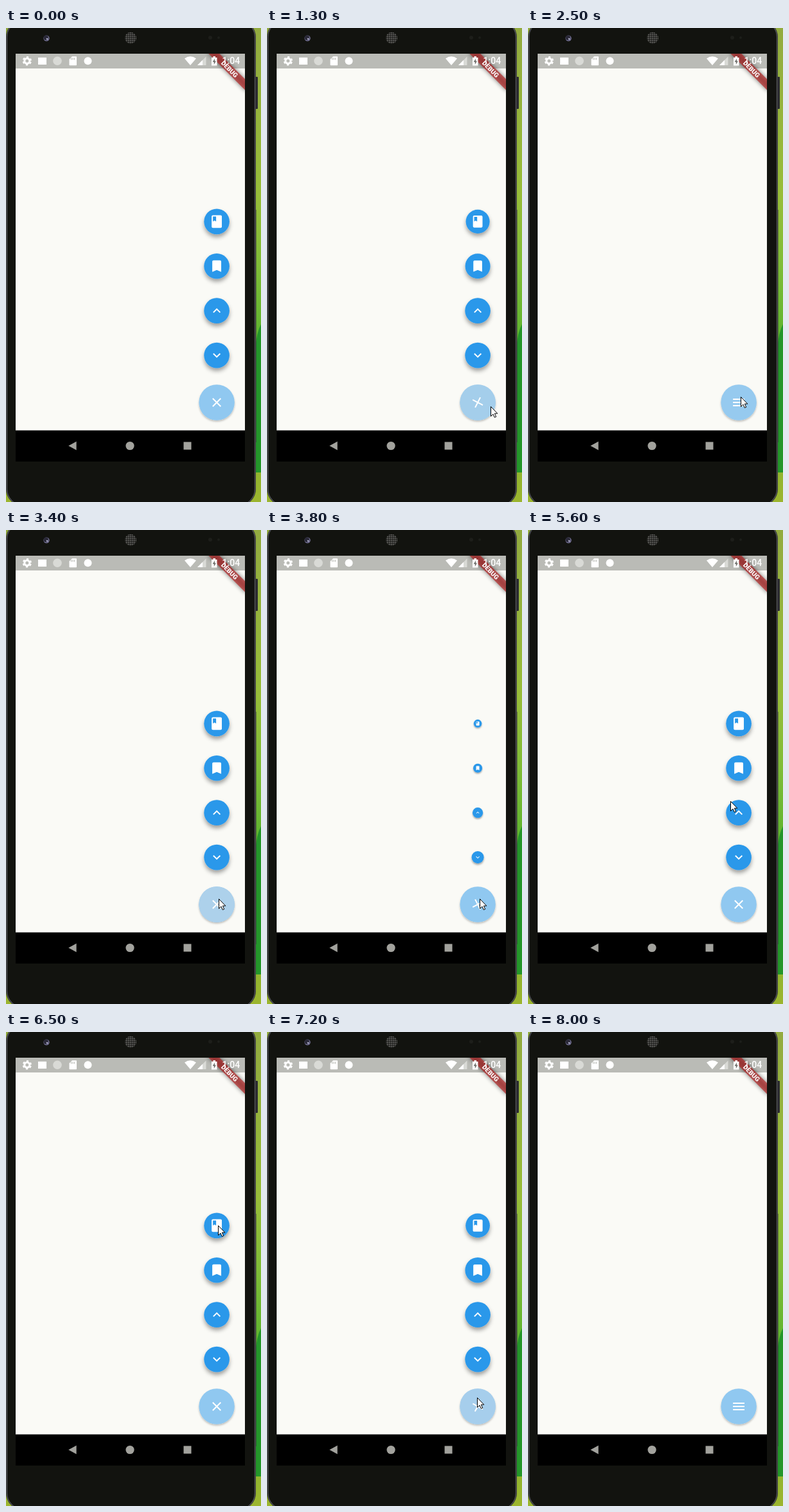
Write an HTML page that moves like this. It is 397x738 px and loops after 8100 ms.

```html
<!DOCTYPE html>
<html lang="en">
<head>
<meta charset="utf-8">
<title>Speed dial</title>
<style>
  html, body { margin: 0; width: 100%; height: 100%; overflow: hidden; }
  svg { display: block; }
  text { font-family: Roboto, sans-serif; fill: #fff; }
</style>
</head>
<body>
<svg width="397" height="738" viewBox="0 0 397 738">
  <defs>
    <linearGradient id="wall" x2="0" y2="1">
      <stop offset="0" stop-color="#93ab40"/>
      <stop offset=".35" stop-color="#98bd3a"/>
      <stop offset=".5" stop-color="#80bd38"/>
      <stop offset=".64" stop-color="#62b530"/>
      <stop offset="1" stop-color="#9cb52f"/>
    </linearGradient>
    <pattern id="grille" width="3" height="3" patternUnits="userSpaceOnUse">
      <rect width="3" height="3" fill="#1c1c1a"/>
      <circle cx="1.5" cy="1.5" r="1" fill="#777774"/>
    </pattern>
    <filter id="shadow" x="-50%" y="-50%" width="200%" height="200%">
      <feDropShadow dx="0" dy="4.5" stdDeviation="3.2" flood-opacity=".36"/>
    </filter>
    <filter id="softShadow" x="-50%" y="-50%" width="200%" height="200%">
      <feDropShadow dx="0" dy="2" stdDeviation="1.6" flood-opacity=".25"/>
    </filter>
    <filter id="blur" x="-20%" y="-200%" width="140%" height="500%">
      <feGaussianBlur stdDeviation="3.9"/>
    </filter>
    <clipPath id="screen"><path d="M15 40H372V626H15z"/></clipPath>
  </defs>

  <rect width="397" height="738" fill="url(#wall)"/>
  <path d="M397 461Q390 474 388 500V692H397z" fill="#24962a"/>

  <!-- phone -->
  <rect x="387" y="76" width="5" height="50" rx="1" fill="#2b2b31"/>
  <path d="M388 283H389.500V645H388z" fill="#34363a"/>
  <rect x=".5" y="-12" width="388" height="756" rx="26" fill="#12130f" stroke="#303130"/>
  <rect x="1.5" y="-11" width="386" height="754" rx="25" fill="none" stroke="#505256" stroke-width="1.4"/>
  <circle cx="63" cy="16" r="4.6" fill="#77759a"/>
  <circle cx="62.3" cy="15.3" r="3.7" fill="#2a2938"/>
  <circle cx="64" cy="17" r="1.3" fill="#b5b4d0"/>
  <circle cx="194" cy="15.5" r="9" fill="url(#grille)"/>
  <circle cx="318" cy="15" r="3" fill="#1d1e1a"/>
  <circle cx="331" cy="15" r="2" fill="#1d1e1a"/>

  <!-- screen -->
  <path d="M15 40H372V627H15z" fill="#fafaf6"/>
  <path d="M15 40H372V63H15z" fill="#babbb6"/>
  <path d="M15 626.500H372V675H15z"/>
  <g fill="#a2a29d">
    <path d="M97.300 650.500L109.600 643.800V657.200z"/>
    <circle cx="193" cy="650.500" r="6.600"/>
    <path d="M276.500 644.500H288.500V656.500H276.500z"/>
  </g>

  <g clip-path="url(#screen)">
    <g transform="translate(372 40) rotate(45)">
      <rect x="-42" y="28" width="84" height="12" opacity=".5" filter="url(#blur)"/>
      <rect x="-42" y="28" width="84" height="12" fill="#b71c1c" opacity=".63"/>
      <text y="37.500" font-size="10" font-weight="900" text-anchor="middle">DEBUG</text>
    </g>
  </g>

  <!-- status bar -->
  <g fill="#fff">
    <g transform="translate(32.800 51.300)" fill="none" stroke="#fff">
      <circle r="4" stroke-width="3"/>
      <circle r="6" stroke-width="2.400" stroke-dasharray="3.140" stroke-dashoffset="4.710"/>
    </g>
    <rect x="50" y="46" width="13" height="11"/>
    <circle cx="80" cy="51.300" r="6.800" fill="#d9dad6"/>
    <path d="M103 44.300H109Q110 44.300 110 45.300V57.300Q110 58.300 109 58.300H99.500Q98.500 58.300 98.500 57.300V48.800z"/>
    <path d="M101.500 46.500V49.500M104 46.500V49.500M106.500 46.500V49.500" stroke="#babbb6" stroke-width="1.200"/>
    <circle cx="127.500" cy="51.300" r="6"/>
    <path d="M278 47.500Q287 41 296 47.500L287 58z"/>
    <path d="M298 58L311.500 44.500V58z" fill="#d9dad6"/>
    <path d="M298 58L306 50V58z"/>
    <path d="M320 46H322.500V44H326V46H328.500V58.500H320z"/>
    <path d="M325 47.500L321.700 53H323.800V57L327 51.500H325z" fill="#70716d"/>
    <text x="336.500" y="56.300" font-size="14" font-weight="500">1:04</text>
  </g>

  <!-- speed dial, in device-independent pixels around the main button -->
  <g transform="translate(328.100 583) scale(.9917)">
    <g id="minis" fill="#fff"></g>
    <circle r="28" fill="#90c8f0" filter="url(#softShadow)"/>
    <circle id="ripple" r="28" fill="#add1eb"/>
    <path id="menu" transform="translate(-12 -12)" fill="#fff" d="M3 18h18v-2H3v2zm0-5h18v-2H3v2zm0-7v2h18V6H3z"/>
    <path id="close" d="M-6.300-6.300L6.300 6.300M6.300-6.300L-6.300 6.300" stroke="#fff" stroke-width="2"/>
  </g>

  <path id="cursor" d="M.5.5V15.500L4 12.200 6.300 17.300 8.700 16.300 6.400 11.200H10.800z" fill="#fff" stroke="#000"/>
</svg>

<script>
const LOOP = 8100, STEP = 100, TOGGLE = 500, MOVE = 400;
const $ = id => document.getElementById(id);

const icons = [
  'M18 2H6c-1.1 0-2 .9-2 2v16c0 1.1.9 2 2 2h12c1.1 0 2-.9 2-2V4c0-1.1-.9-2-2-2zM6 4h5v8l-2.5-1.5L6 12V4z',
  'M17 3H7c-1.1 0-2 .9-2 2v16l7-3 7 3V5c0-1.1-.9-2-2-2z',
  'M12 8l-6 6 1.4 1.4L12 10.8l4.6 4.6L18 14z',
  'M16.6 8.6L12 13.2 7.4 8.6 6 10l6 6 6-6z'
];
$('minis').innerHTML = icons.map(d =>
  `<g><circle r="20" fill="#2b98ea" filter="url(#shadow)"/><path transform="translate(-12 -12)" d="${d}"/></g>`).join('');
const minis = [...$('minis').children];

// Each tap toggles the menu, which is open at first.
const taps = [1200, 2580, 3400, 5080, 7115];

// Where the pointer arrives, and when.
const stops = [
  { at: 1300, x: 348, y: 589 },
  { at: 2400, x: 331, y: 574 },
  { at: 4600, x: 321, y: 583 },
  { at: 5600, x: 315, y: 422 },
  { at: 6000, x: 330, y: 301 },
  { at: 7100, x: 327, y: 569 },
  { at: 7900, x: 410, y: 700 }
];

const clamp = v => Math.max(0, Math.min(1, v));
const easeOut = p => 1 - (1 - p) ** 1.7;
const easeInOut = p => p * p * (3 - 2 * p);

const openness = t => taps.reduce((open, tap, i) => {
  const p = clamp((t - tap) / TOGGLE);
  return open + (i % 2 ? p : -p);
}, 1);

// Quick rise before a tap, slower fade after it.
const ripple = t => Math.max(...taps.map(tap =>
  clamp(1 - (t < tap ? (tap - t) / 100 : (t - tap) / 350))));

function pointer(t) {
  let { x, y } = stops[stops.length - 1];
  for (const stop of stops) {
    const p = easeInOut(clamp((t - stop.at + MOVE) / MOVE));
    x += (stop.x - x) * p;
    y += (stop.y - y) * p;
  }
  return [x, y].map(Math.round);
}

function draw(now) {
  const t = Math.floor(now % LOOP / STEP) * STEP;
  const open = clamp(openness(t));
  minis.forEach((mini, i) => {
    const scale = easeOut(Math.min(1, open / (1 - i / 8)));
    mini.setAttribute('transform', `translate(0 ${-284 + i * 70}) scale(${scale})`);
    mini.style.display = scale ? '' : 'none';
  });
  $('menu').style.display = open ? 'none' : '';
  $('close').style.display = open ? '' : 'none';
  $('close').setAttribute('transform', `rotate(${open * 90})`);
  $('ripple').setAttribute('opacity', ripple(t));
  $('cursor').setAttribute('transform', `translate(${pointer(t)})`);
}

const start = performance.now();
(function tick() {
  draw(performance.now() - start);
  requestAnimationFrame(tick);
})();
</script>
</body>
</html>
```
